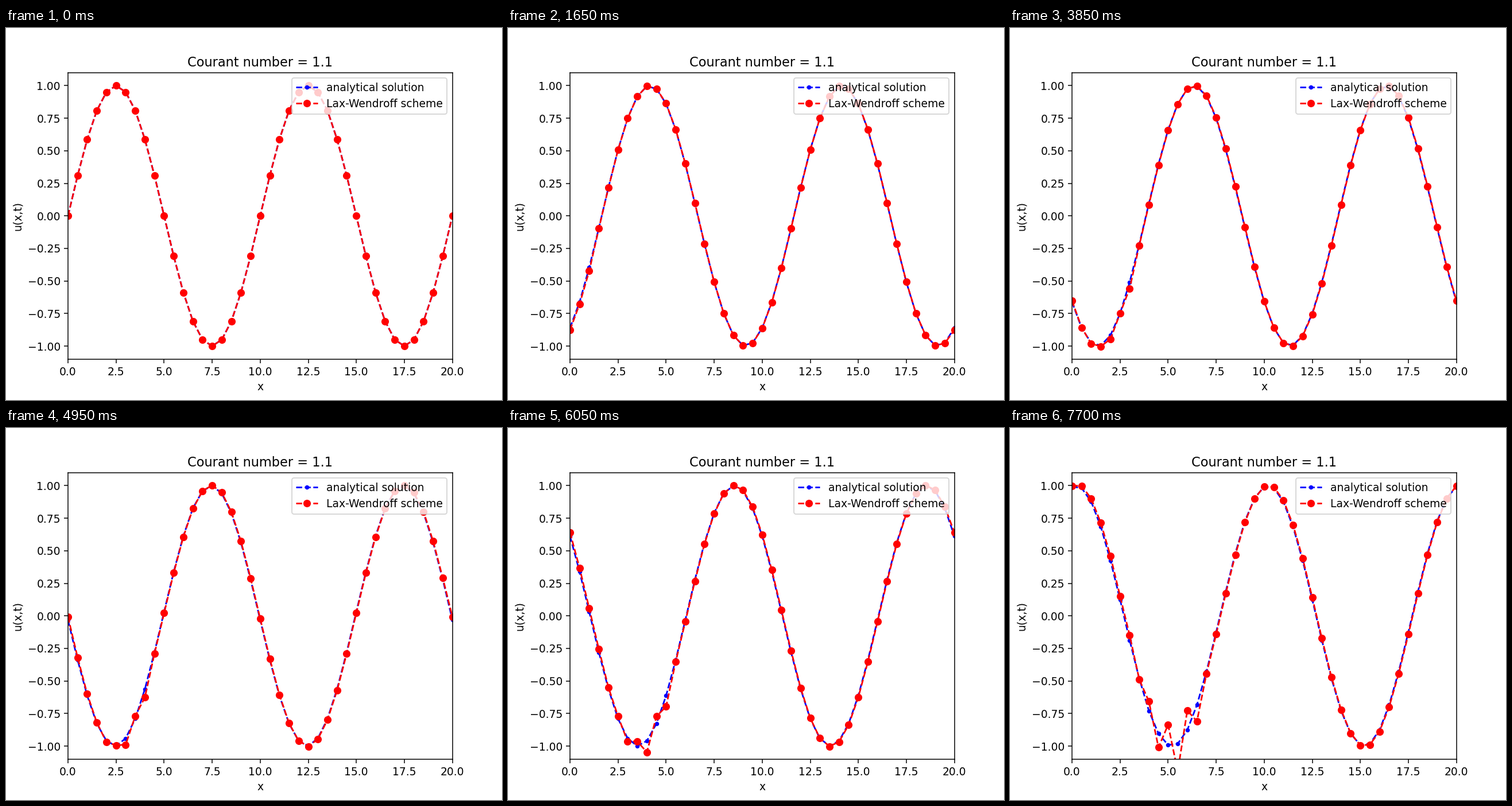
Recreate the animation shown at these times as a matplotlib script. Size 864 px wide and 648 px high, loop 8 s.

```python
import numpy as np
import matplotlib.pyplot as plt
from matplotlib.animation import FuncAnimation

LENGTH, WAVELENGTH = 20.0, 10.0
CELLS = 40
COURANT = 1.1
DX = LENGTH / CELLS
TICK_MS, LOOP_MS, STEP_MS = 50, 8000, 550
FRAMES = LOOP_MS // TICK_MS
STEPS = (LOOP_MS - 1) // STEP_MS

x = np.linspace(0, LENGTH, CELLS + 1)


def exact(step):
    """Initial sine wave carried along by whole time steps."""
    return np.sin(2 * np.pi * (x - COURANT * DX * step) / WAVELENGTH)


def lax_wendroff(u):
    """One time step; the right end wraps round and is copied to the left."""
    left, right = np.roll(u, 1), np.roll(u, -1)
    new = (u - COURANT / 2 * (right - left)
           + COURANT ** 2 / 2 * (right - 2 * u + left))
    new[0] = new[-1]
    return new


numeric = [exact(0)]
for _ in range(STEPS):
    numeric.append(lax_wendroff(numeric[-1]))

fig, ax = plt.subplots(figsize=(6.4, 4.8), dpi=135)
exact_line, = ax.plot(x, exact(0), "b.--", label="analytical solution")
scheme_line, = ax.plot(x, numeric[0], "ro--", label="Lax-Wendroff scheme")
ax.set(xlim=(0, LENGTH), ylim=(-1.1, 1.1), xlabel="x", ylabel="u(x,t)",
       title=f"Courant number = {COURANT}")
ax.legend(loc="upper right")


def draw(frame):
    step = frame * TICK_MS // STEP_MS
    exact_line.set_ydata(exact(step))
    scheme_line.set_ydata(numeric[step])
    return exact_line, scheme_line


anim = FuncAnimation(fig, draw, frames=FRAMES, interval=TICK_MS,
                     init_func=lambda: draw(0), repeat=True, repeat_delay=0)
plt.show()
```
